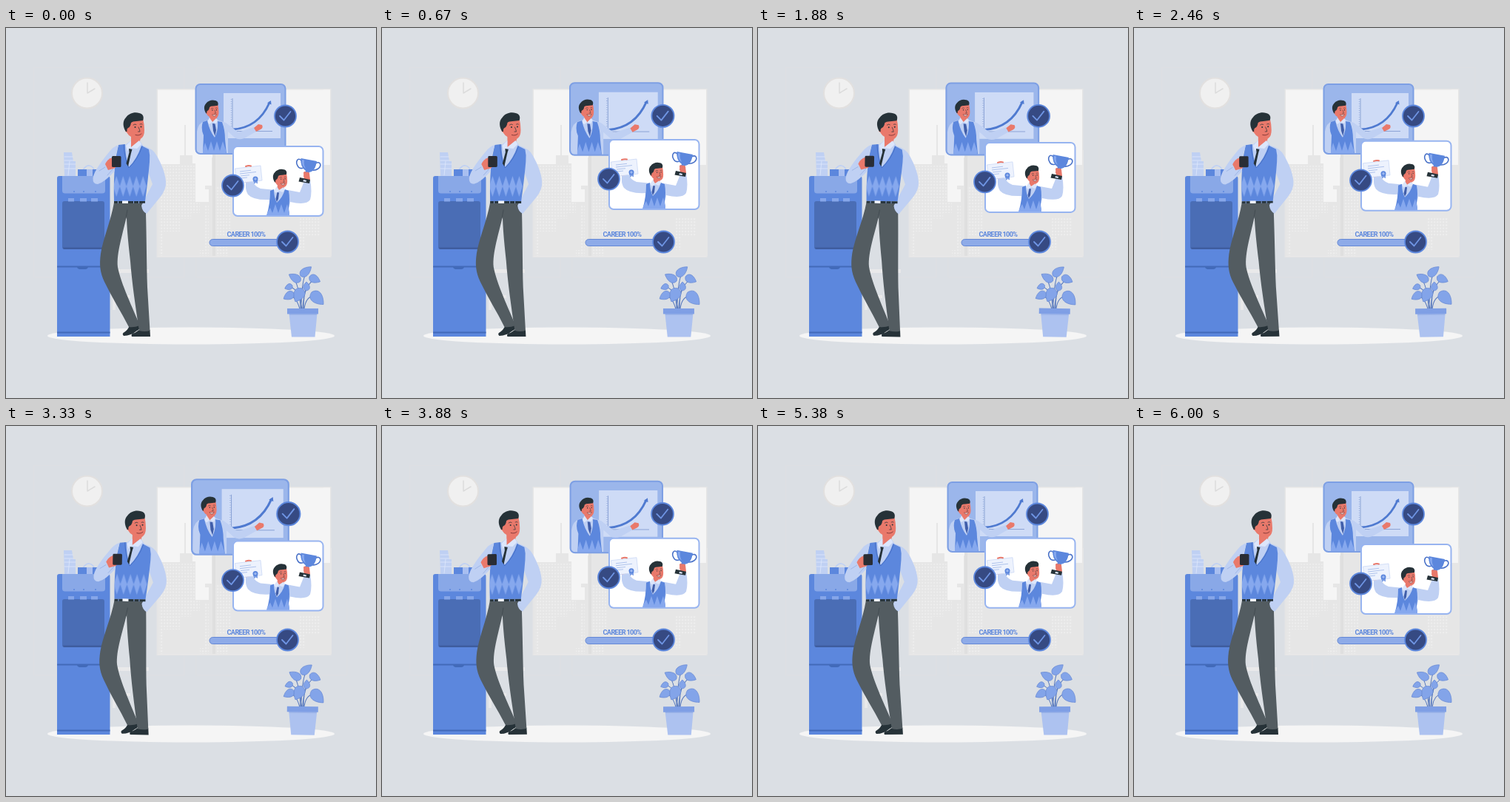
Animation of 500x500 px, one loop 6.04 s. Source, as an HTML page:

```html
<!DOCTYPE html>
<html lang="en">
<head>
<meta charset="utf-8">
<title>Career</title>
<style>
html, body { margin: 0; width: 100%; height: 100%; overflow: hidden; background: #dbdfe4; }
svg { display: block; width: 100%; height: 100%; }
.blue { fill: #5c87dd; }
.sleeve { fill: #bfd0f3; }
.collar { fill: #dce6fb; }
.skin { fill: #e9796b; }
.dark { fill: #263238; }
.line { fill: none; stroke-linecap: round; stroke-linejoin: round; }
.label { font: 700 9.2px Roboto, sans-serif; letter-spacing: -.65px; fill: #5c87dd; }
</style>
</head>
<body>
<svg viewBox="0 0 500 500">
<defs>
  <pattern id="panes" width="4" height="4.2" patternUnits="userSpaceOnUse">
    <rect x="1" y="1" width="2.2" height="2" fill="#eeeeee"/>
  </pattern>
  <pattern id="argyle" x="144.7" y="198" width="9" height="32" patternUnits="userSpaceOnUse">
    <path d="M4.5 2L9 16 4.5 30 0 16Z" fill="#86a8ee"/>
  </pattern>
  <clipPath id="clip1"><rect x="257.500" y="77" width="119" height="92" rx="5"/></clipPath>
  <clipPath id="clip2"><rect x="308" y="161" width="119.500" height="92" rx="5"/></clipPath>
  <g id="badge">
    <circle r="14.500" fill="#364a83" stroke="#5c87dd" stroke-width="1.800"/>
    <path class="line" d="M-7.500 0L-2 5.500 7 -6" stroke="#6f95e4" stroke-width="1.800"/>
  </g>
  <g id="head">
    <path class="skin" d="M164 126L185 122Q187 130 187 138Q187 146 183 149Q179 152 172 149L166 145L163 141Z"/>
    <circle class="skin" cx="164" cy="138" r="3"/>
    <path class="dark" d="M162 140C158 134 157 126 162 121C166 115 174 113 180 115C185 116 187 120 185 125L176 126Q171 126 169 128Q168 134 165 135Q163 136 163.500 140Z"/>
    <circle class="dark" cx="174.500" cy="134" r="1"/><circle class="dark" cx="182.500" cy="133.500" r="1"/>
    <path class="line" d="M172 131Q174 129 176 130.500M181 130Q183 129 184 130M179 134Q181 138 181 140L178.500 140" stroke="#263238" stroke-width=".7"/>
  </g>
  <path id="smile" d="M174 142.500Q179 144 182.500 142Q181.500 146 178 146Q175 145.500 174 142.500Z" fill="#f7e4e2" stroke="#7d3434" stroke-width=".9"/>
</defs>

<!-- room -->
<path d="M37.500 53.500H241V337H37.500ZM257 53.500H461V337H257Z" fill="none" stroke="#dedfe2"/>
<circle cx="109.500" cy="88" r="20.500" fill="#f0f0f0" stroke="#e2e0df" stroke-width="2"/>
<path class="line" d="M110 74V88L120 82" stroke="#dcdcdc" stroke-width="1.500"/>
<rect x="203.500" y="82" width="236" height="228" fill="#e5e5e5"/>
<rect x="205" y="83.500" width="233" height="225" fill="#f5f5f5"/>
<path d="M205 308.500V184H235V172H241V131H243V172H252V183H256V235H274V218H269V213H278V175H282V165H440V308.500Z" fill="#e6e6e6"/>
<path d="M207 186H255V235H262V300H268V240H274V308H262V250H250V258H235V275H212V308H207ZM283 215H305V280H283ZM296 296H300V308H284V296ZM411 256H424V282H404V300H396V256Z" fill="url(#panes)"/>
<path d="M279 165H283V308H279Z" fill="#dfdfdf"/>
<path d="M429 83.500H438V185H429Z" fill="#f5f5f5"/>
<path d="M150 326H193V331H150ZM144 361H168V365H148V381H144Z" fill="#e9e9ea"/>
<ellipse cx="250" cy="416" rx="194" ry="11.500" fill="#f5f5f5"/>

<!-- water cooler -->
<path class="sleeve" d="M78 168H89L91 180H94V200H79Z"/>
<path class="line" d="M79 174H90M79 179H91M79 184H94M79 190H94M86 180L84 199" stroke="#dfe8fb" stroke-width=".8"/>
<path class="line" d="M104 192Q108 185 113 186Q119 187 122 199" stroke="#bfd0f3" stroke-width="1.500"/>
<path class="blue" d="M97 191H110V201H97Z"/>
<path d="M109 191H120V201H109Z" fill="#a9bff0"/>
<path class="blue" d="M117 191H128V201H117ZM69 203Q69 200 72 200H137.500Q140.500 200 140.500 203V417H69Z"/>
<path d="M76 200H134V220Q134 223.500 130 223.500H80Q76 223.500 76 220Z" fill="#89a8e7"/>
<path d="M104 221h2m14 0h2m-31 0h2" stroke="#5c87dd" stroke-width="1.500"/>
<rect x="76" y="234" width="57" height="65" rx="3" fill="#4a6db5"/>
<path d="M77 296.500H132Q131 299 129 299H79Q77 299 77 296.500Z" fill="#3f5d9f"/>
<path d="M84 230h8v4.500h-8zM100 230h9v4.500h-9zM115 230h9v4.500h-9z" fill="#86a6e9"/>
<path d="M69 322.500H140.500M69 411.500H140.500" stroke="#426ab9" stroke-width="1.800"/>
<path d="M96 323H111Q110 326 107 326H99Q96 325 96 323Z" fill="#426ab9"/>

<!-- leaning man -->
<g id="man">
  <path class="dark" d="M168 400L181 402Q181 408 177 409Q169 416 159 416Q156 413 160 411Q165 408 168 400ZM180 408H194.500L195 417H170Q168 413 174 412Z"/>
  <path d="M146 236C142 260 131 285 128 305C126 320 127 330 133 343C143 364 156 384 166 404Q173 405 181 402C172 380 155 345 151 323C149 304 158 278 164 250L178 236Z" fill="#535c61"/>
  <path d="M163 236H188L189 250C190 285 190 320 191 350L194.500 409Q187 411 180 409C175 377 170 342 168 315C165 288 162 260 163 236Z" fill="#535c61"/>
  <path class="line" d="M164 246Q163 252 162 257M188 247Q184 245 182 239" stroke="#3f484e" stroke-width=".8"/>
  <path class="sleeve" d="M161 158L169 152L181 153L186 160L174 180L166 189L159 175Z"/>
  <path class="skin" d="M169 144L182 149L180 156L169 162Z"/>
  <path class="collar" d="M169 152L162 159L164 166L169 162L177 163L183 157L180 152L169 161Z"/>
  <path class="sleeve" d="M185 159Q199 163 204 173C210 184 215 195 216 207Q217 218 208 229L190 251Q184 248 183 240L198 211L188 183Z"/>
  <path class="blue" d="M152 158L161 157Q161 174 166 188Q177 177 183 159L193 164Q195 172 194 181Q192 205 188 234H146Q145 195 149 172Z"/>
  <path d="M146 198H191L188 231H146Z" fill="url(#argyle)"/>
  <path class="line" d="M159 158Q160 175 166 189Q178 178 184 160" stroke="#416ac0" stroke-width=".8"/>
  <path class="dark" d="M166 163L170.500 164L169 169L165 187L162.500 183L166.500 168Z"/>
  <path class="sleeve" d="M152 158Q145 160 139 168C130 179 119 193 117.500 203Q117 211 124 211Q134 208 147 193L143 185L134 188L148 173Z"/>
  <path class="line" d="M126 193L134 188M145 190L137 199" stroke="#91abe0" stroke-width=".7"/>
  <path class="skin" d="M134 184Q137 177 144 175L148 178L148 189L138 192Z"/>
  <rect x="143" y="173" width="12.500" height="15" rx="1.500" fill="#292d35"/>
  <path d="M146 234H188V236.800H146Z" fill="#27343c"/>
  <path d="M157 233.500H165V237H157Z" fill="#f2f5fc"/>
  <path d="M172 234h1v3h-1zM179 234h1v3h-1zM151 234h1v3h-1z" fill="#8aa4dc"/>
  <use href="#head"/>
  <path class="line" d="M175 144.500Q180 146 183 143" stroke="#7d3434" stroke-width=".9"/>
</g>

<!-- presentation card -->
<g id="growth">
  <rect x="256.500" y="76" width="121" height="94" rx="6" fill="#9bb6eb"/>
  <rect x="294" y="88" width="77" height="61" fill="#cedbf6"/>
  <path d="M306 95V140M302 139.500H360" stroke="#7d97cf" stroke-width=".8"/>
  <path d="M304.500 96V139" stroke="#7d97cf" stroke-width="1.500" stroke-dasharray=".5 2.500"/>
  <path class="line" d="M307 137C333 135 348 119 356 101" stroke="#4f7ad0" stroke-width="2.800"/>
  <path d="M358 98L358.500 103.500L353 101.500Z" fill="#4f7ad0"/>
  <g clip-path="url(#clip1)">
    <path class="sleeve" d="M268 126Q260 128 258 140L257 170H300V140L309 148Q314 152 322 149L338 140L335 134L314 141L297 128L285 124L274 124Z"/>
    <path class="skin" d="M275 117L285 121L283 127H275Z"/>
    <path class="collar" d="M275 121L272 127L275 130L279 127L284 129L286 124L284 122L279 127Z"/>
    <path class="blue" d="M266 127L272 125Q275 139 282 148Q287 138 286 126L292 127Q296 138 296 150L298 171H266L267 145Q263 136 266 127Z"/>
    <path d="M266 165l3-10 4 11 4-13 4 13 4-13 4 13 4-13 4 12v5h-31z" fill="#86a8ee"/>
    <path d="M279 129L282.500 129.500L284 138L282.500 146L280 139Z" fill="#405eaa"/>
    <path class="skin" d="M335 135L341 130L346 131Q348 135 344 137L338 140Z"/>
  </g>
  <g transform="translate(158.500 18.600) scale(.69)"><use href="#head"/><use href="#smile"/></g>
  <rect x="256.500" y="76" width="121" height="94" rx="6" fill="none" stroke="#7d9fe4" stroke-width="2"/>
  <use href="#badge" x="377.500" y="119"/>
</g>

<!-- award card -->
<g id="award">
  <rect x="307" y="160" width="121.500" height="94" rx="6" fill="#fff"/>
  <g clip-path="url(#clip2)">
    <path class="skin" d="M322 205L329 203L332 210L326 213ZM402 195Q406 192 410 196L411 205L403 207Z"/>
    <path class="sleeve" d="M324 209L333 207Q336 214 344 217L365 219H381L397 222L403 207L411 205Q414 222 411 232Q406 240 384 235L380 254H356V232Q334 233 327 225Q323 219 324 209Z"/>
    <path class="skin" d="M367 211L376 215L375 220H366Z"/>
    <path class="collar" d="M366 214L362 220L365 223L369 220L374 222L377 218L375 215L369 219Z"/>
    <path class="blue" d="M357 220L362 218Q362 229 366 236Q374 229 377 218L382 220Q384 232 382 243L383 254H352Q357 238 357 220Z"/>
    <path d="M353 250l4-7 3 7 4-12 4 12 4-12 4 12 4-12 3 12v4h-31z" fill="#86a8ee"/>
    <path d="M366.500 222L369 222.500L368 231L366 235L364.500 231Z" fill="#405eaa"/>
  </g>
  <g transform="translate(253 113) scale(.68)"><use href="#head"/><use href="#smile"/></g>
  <path d="M309.500 190L344 186L346 206L312 210Z" fill="#edf2fd" stroke="#cbd8f5" stroke-width=".8"/>
  <path d="M316 194L331 192.300M316 197L338 194.500M317 200L329 198.700M317 203L326 202" stroke="#9fb6e8" stroke-width=".8"/>
  <path d="M334 206L335 211L337.500 209L340 210.500L340 205Z" fill="#7d9fe4"/>
  <circle cx="337" cy="204" r="3.500" fill="#5c87dd"/><circle cx="337" cy="204" r="1.700" fill="#9db8f0"/>
  <path class="line" d="M324 187Q328 185.500 331 186.500" stroke="#e9796b" stroke-width="2"/>
  <path class="line" d="M399 179C394 174 391 181 394 186Q396 191 402 189M418 183C425 179 427 186 422 190Q418 193 413 192" stroke="#4a72c8" stroke-width="1.600"/>
  <path class="blue" d="M398.500 176L420 180Q418 194 409.500 195L409 200L404 199L405 193Q397 187 398.500 176Z"/>
  <path d="M400 178L403 178.500Q402 185 405 190Q399 186 400 178Z" fill="#86a8ee"/>
  <path class="dark" d="M397 202L411 205L410 210L395.500 207.500Z"/>
  <path class="collar" d="M402 205L406 206L405.500 208L401.500 207.200Z"/>
  <path class="skin" d="M403 196Q407 193 410 196L409 202L402 201Z"/>
  <rect x="307" y="160" width="121.500" height="94" rx="6" fill="none" stroke="#97b4f0" stroke-width="2"/>
  <use href="#badge" x="306.500" y="213"/>
</g>

<!-- progress -->
<text class="label" x="324.500" y="281.500" text-anchor="middle">CAREER 100%</text>
<rect x="275" y="285.500" width="104" height="9" rx="4.500" fill="#8eabe8" stroke="#6488d6"/>
<use href="#badge" x="380.500" y="289"/>

<!-- plant -->
<g id="plant">
  <path class="line" d="M399 380Q399 346 405 331M400 380Q397 355 390 339M401 380Q402 350 415 341M398 380Q398 354 384 350M402 380Q402 362 406 350M397 380Q393 364 384 362M403 380Q405 361 419 362" stroke="#5577bd" stroke-width="1"/>
  <g id="leaves" fill="#83a4e9" stroke="#6789d4" stroke-width=".7"></g>
  <path d="M382.500 386H420.500L417.500 417.500H386Z" fill="#adc2f0"/>
  <path d="M382.800 386.500H420.200L419.800 388H383Z" fill="#9cb4e8"/>
  <rect x="380" y="379" width="42" height="7.500" fill="#7f9fe5"/>
</g>
</svg>
<script>
const $ = id => document.getElementById(id);

// base x, base y, angle, length, half width
$("leaves").innerHTML = [
  [398, 335, -40, 19, 5.5], [398, 342, -150, 18, 5.5], [410, 336, 25, 16, 5.5],
  [387, 348, 158, 11, 4], [406, 355, -90, 12, 4.5], [389, 358, 150, 16, 5.5],
  [400, 352, 117, 20, 7.5], [413, 357, 46, 23, 8]
].map(([x, y, angle, len, w]) =>
  `<path transform="translate(${x} ${y}) rotate(${angle})" d="M0 0C${len * .1} ${-w * 1.4} ${len * .6} ${-w * 1.2} ${len} 0C${len * .6} ${w * 1.2} ${len * .1} ${w * 1.4} 0 0Z"/>`
).join("");

// Linear interpolation through [time, value] keys
function track(t, keys) {
  const i = keys.findIndex(k => k[0] >= t);
  if (i < 1) return keys[Math.max(i, 0)][1];
  const [t0, v0] = keys[i - 1], [t1, v1] = keys[i];
  return v0 + (v1 - v0) * (t - t0) / (t1 - t0);
}

const LOOP = 6040, BEAT = 1500;
const sway = [[0, 0], [375, 1], [1125, -1], [1500, 0]];
const float = [[0, 0], [750, -10], [1500, 0]];
const pulse = [[0, 1], [450, 1], [1050, 1.1], [2250, 1], [2850, 1], [3450, 1.1], [4050, 1], [6000, 1]];

function draw() {
  const t = Math.min(performance.now() % LOOP, 6000), beat = t % BEAT;
  const angle = track(beat, sway), scale = track(t, pulse);
  const move = (id, value) => $(id).setAttribute("transform", value);
  move("man", `rotate(${angle} 167 266)`);
  move("plant", `rotate(${angle} 403 370)`);
  move("award", `translate(0 ${track(beat, float)})`);
  move("growth", `translate(324 123) scale(${scale}) translate(-324 -123)`);
  requestAnimationFrame(draw);
}
draw();
</script>
</body>
</html>
```
